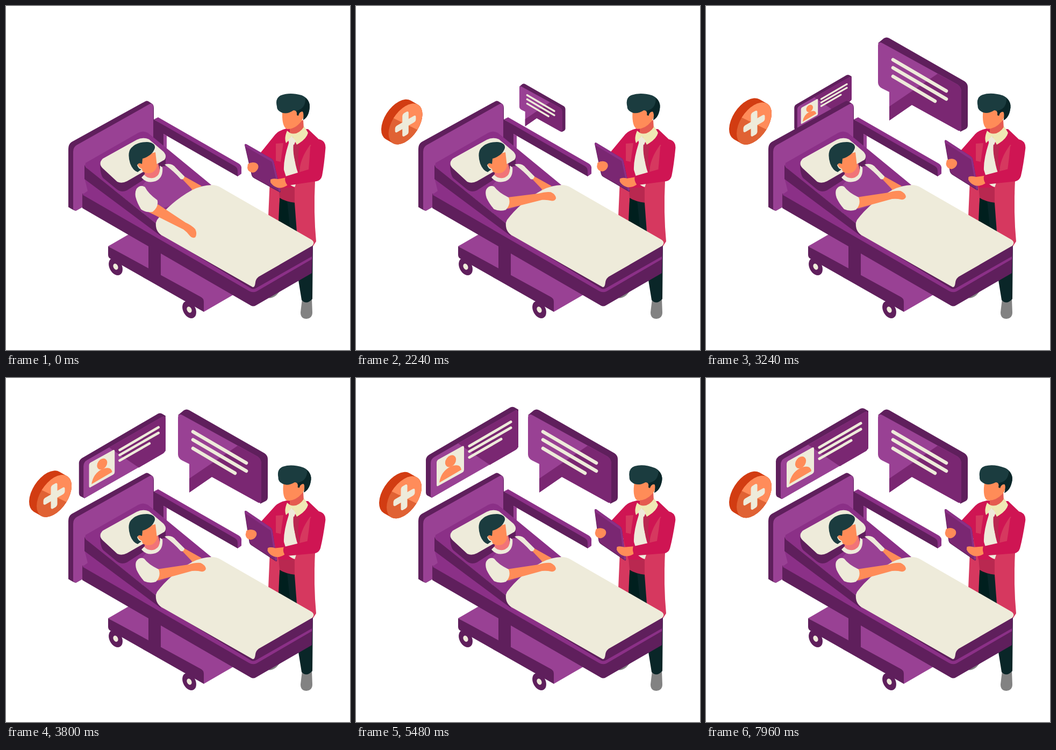
These frames come from a looping animation (640 px wide and 640 px high, 8 s). An HTML page:

```html
<!DOCTYPE html>
<html lang="en">
<head>
<meta charset="utf-8">
<title>Hospital visit</title>
<style>
html, body { margin: 0; width: 100%; height: 100%; overflow: hidden; background: #fff; }
svg { display: block; width: 100vw; height: 100vh; }
.dark { fill: #5f1f5c; } .mid { fill: #8b3087; } .light { fill: #994194; } .shade { fill: #7a2772; }
.cream { fill: #eeebda; } .skin { fill: #ff8c58; } .hair { fill: #1b3c3f; } .night { fill: #0a2628; }
.red { fill: #cf1553; } .coat { fill: #d6385f; } .wine { fill: #b92850; } .grey { fill: #828282; }
.rules { fill: none; stroke: #eeebda; stroke-linecap: round; }
</style>
</head>
<body>
<svg viewBox="0 0 640 640">
  <g id="badge">
    <g transform="translate(89.5 217.5) matrix(1 -.577 0 1.06 0 0)">
      <path d="M0 0L-14 -15.2" stroke="#d23c12" stroke-width="65" stroke-linecap="round"/>
      <circle r="32.5" fill="#e06234"/>
      <path d="M-23 -23A32.5 32.5 0 0 1 23 23Z" fill="#ff8c5a"/>
      <rect class="cream" x="-20" y="-6" width="40" height="12" rx="4"/>
      <rect class="cream" x="-6" y="-21" width="12" height="42" rx="4"/>
    </g>
  </g>

  <g id="bubble">
    <path class="dark" d="M320 69L331 60Q336 57 341 60L481 140Q487 144 487 151V222Q487 227 483 229L473 234 460 170Z"/>
    <path class="light" d="M320 74Q320 65 328 69L468 146Q475 151 475 160V226Q475 235 468 231L383 184 341 213V160L327 153Q320 149 320 142Z"/>
    <path class="shade" d="M431 126L468 146Q475 151 475 160V226Q475 235 468 231L383 184 341 213V187Z"/>
    <path class="rules" stroke-width="6.5" d="M348 100L447 158M348 115L447 173M348 131L426 177"/>
  </g>

  <g id="card">
    <path class="dark" d="M130 152Q130 146 136 142L287 54Q291 52 295 54L302 58V128L141 222 133 218Q130 216 130 212Z"/>
    <path class="light" d="M139 158Q139 150 146 146L294 61Q302 57 302 65V123Q302 130 297 133L141 222 139 219Z"/>
    <path class="shade" d="M190 121L294 61Q302 57 302 65V123Q302 130 297 133L249 161Z"/>
    <path class="cream" d="M150 157Q150 153 153 151L198 126Q201 125 201 128V170Q201 173 198 175L153 200Q150 202 150 198Z"/>
    <path class="skin" d="M155 194Q158 173 176 164Q194 157 196 170Z"/>
    <ellipse class="skin" cx="176" cy="154" rx="9" ry="12" transform="rotate(36 176 154)"/>
    <path class="rules" stroke-width="5" d="M211 126L288 81M211 136L288 92M211 147L270 113"/>
  </g>

  <g id="doctor">
    <path class="grey" d="M483 541Q492 547 503 538L513 527 495 530ZM551 545L548 570Q548 582 559 582Q570 581 570 570L569 545Z"/>
    <path class="night" d="M509 355H570L571 440 570 545Q559 557 550 547L544 510 506 400Z"/>
    <path d="M509 355L523 362 528 410 506 402Z" fill="#001f1e"/>
    <path class="coat" d="M492 300L488 391 507 402 509 357 515 300Z"/>
    <path class="wine" d="M503 290H548V340L538 366Q520 364 509 357Z"/>
    <g id="farArm">
      <path class="red" d="M522 228Q508 231 501 239L472 275 492 300 520 272Z"/>
    </g>
    <path class="red" d="M522 228Q508 232 502 250L495 290 507 338H548L580 300 583 249 562 229Z"/>
    <path class="coat" d="M502 256L516 255 511 290 502 288Z"/>
    <path class="cream" d="M527 252Q516 285 517 305L525 330Q537 340 547 338L550 325Q535 300 535 255Z"/>
    <path class="coat" d="M566 258Q546 285 546 310L537 338V366L541 420 571 447 577 438Q572 385 575 325L590 270Z"/>
    <path class="red" d="M541 257L561 235 580 247 558 258Q545 275 546 306Q535 286 541 257Z"/>
    <path class="wine" d="M541 257L535 255Q532 282 545 306L547 303Q540 285 547 259Z"/>
    <path d="M528 222L553 212 554 228Q545 243 528 236Z" fill="#e55b50"/>
    <path d="M523 232Q517 246 521 255L533 243 541 258Q559 248 562 236L555 224Q543 242 528 236Z" fill="#f0e9b4"/>
    <path class="cream" d="M532 242L539 251 536 258 527 257 525 249Z"/>
    <g id="head">
      <path class="skin" d="M514 190V207Q515 226 523 229Q538 229 549 215Q556 206 554 196L540 185Z"/>
      <path class="hair" d="M504 187Q500 171 512 166Q528 160 550 166Q565 172 565 188Q564 206 553 212Q555 197 551 196Q545 197 544 204L541 203Q542 194 535 194Q520 204 509 196Q504 193 504 187Z"/>
      <path class="night" d="M557 171Q566 178 565 188Q563 206 553 212Q555 197 551 196Q545 197 544 204L541 203Q542 198 540 195Q558 191 557 171Z"/>
    </g>
    <g id="tablet">
      <path class="dark" d="M444 259Q444 256 447 257L494 284Q497 286 498 289L511 344Q511 348 508 346L461 320Q458 318 457 315Z"/>
      <path class="shade" d="M447 258L493 285Q495 286 496 289L509 345 461 319 458 315 445 261Z"/>
      <path class="mid" d="M444 259Q444 256 447 257L494 284Q497 286 498 289L511 344 508 346 495 290 446 262Z"/>
      <path class="skin" d="M450 294Q457 289 465 292Q471 295 469 302Q466 309 459 310Q450 309 449 301Z"/>
      <path class="skin" d="M492 323Q496 320 506 322L522 319 524 333Q515 340 505 338Q496 335 492 328Z"/>
    </g>
    <g id="nearArm">
      <path class="red" d="M566 262Q573 248 583 248Q595 251 594.5 264Q592 295 588 316Q586 324 578 326L524 334Q517 325 520 317L563 304Q565 282 566 262Z"/>
    </g>
  </g>

  <g id="bed">
    <path class="light" d="M190 447L228 425 240 420 425 530V536L368 569 360 545Z"/>
    <path class="dark" d="M190 447L362 541Q368 544 368 550V569L194 470Q190 468 190 463ZM265 428L288 440V501L265 488Z"/>
    <g id="wheel">
      <ellipse class="dark" rx="11.5" ry="17" transform="translate(204 485) rotate(-28)"/>
      <ellipse class="cream" rx="4.2" ry="6" transform="translate(204 485) rotate(-28)"/>
    </g>
    <use href="#wheel" x="137" y="80"/>

    <path class="mid" d="M275 211L283 207 433 293Q439 297 438 303V312L431 317 420 300Z"/>
    <path class="dark" d="M275 211L426 298Q431 301 431 307V317L293 238V268L275 255Z"/>
    <path class="light" d="M293 238L299 241V272L293 268Z"/>

    <path class="dark" d="M116 266Q116 257 122 253L258 178Q262 175 266 178L272 182Q275 184 275 190V300L130 381Q127 381 116 374Z"/>
    <path class="light" d="M125 271Q125 263 131 259L266 183Q274 179 274 188V300L130 381 125 378Z"/>

    <path class="dark" d="M142 349V376L455 557Q460 560 465 557L569 497 571 444 460 490 280 410Z"/>
    <path class="mid" d="M142 351L152 344 146 320 290 425 455 525Q460 528 465 525L569 466V471L466 531Q459 534 452 530Z"/>
    <path class="mid" d="M148 292L246 236Q255 231 264 236L382 333 288 412 147 300Z"/>
    <path class="dark" d="M146 295Q147 300 152 303L282 407 288 428 146 322Z"/>
    <path class="dark" d="M175 297Q176 318 183 322L206 341Q215 348 225 343L297 297 297 280Z"/>
    <path class="cream" d="M180 284L243 249Q255 243 266 248L293 271Q300 279 295 286L225 326Q215 331 207 327L180 302Q171 293 180 284Z"/>

    <path class="skin" d="M330 316L364 335 348 344Q335 335 326 322Z"/>
    <path class="light" d="M252 336L262 324Q285 330 291 298L304 299 328 322 346 341 310 370 286 378 270 376Z"/>
    <path d="M260 305L283 293Q289 312 283 318Q272 325 257 315Z" fill="#f17478"/>
    <path class="cream" d="M252 319Q262 331 278 326Q293 320 291 300L286 297Q288 314 277 319Q266 323 257 314Z"/>
    <path class="cream" d="M295 295Q308 291 316 301L332 317Q331 324 325 322Q313 308 295 295Z"/>
    <path class="skin" d="M244 291Q245 300 253 303Q253 311 265 311Q277 311 281 298L278 272Q258 276 250 288Z"/>
    <path class="hair" d="M231 293Q225 273 233 264Q243 253 262 253Q278 254 277 264Q273 278 254 284L253 294Q247 290 244 296Q246 303 252 304L245 309Q236 306 231 293Z"/>
    <path class="cream" d="M281 398Q305 366 345 343Q365 333 383 333Q392 333 400 338L567 434Q576 439 570 446L473 502Q465 506 464 514Q463 524 459 523L294 429Q277 421 279 403Z"/>

    <g id="upperArm">
      <path id="forearm" class="skin" d="M280 356L340 347Q352 343 362 344Q371 348 372 355Q370 361 363 360Q355 358 346 359L277 378 265 378Z"/>
      <path class="cream" d="M242 342Q248 332 257 336Q265 347 284 356Q289 368 279 379Q268 383 257 378Q248 368 243 357Q240 349 242 342Z"/>
    </g>
  </g>
</svg>
<script>
const LOOP = 8000;
const byId = id => document.getElementById(id);
const move = (id, transform) => byId(id).setAttribute("transform", transform);
const progress = (t, start, length) => Math.min(1, Math.max(0, (t - start) / length));
const wave = x => (1 - Math.cos(Math.PI * x)) / 2;
const cubic = x => x < .5 ? 4 * x ** 3 : 1 - 4 * (1 - x) ** 3;

// The picture advances in steps of 112 ms rounded to a 40 ms grid.
function stepTime(t) {
  const start = n => Math.round(n * 2.8) * 40;
  let n = Math.floor(t / 112) + 1;
  while (start(n) > t) n--;
  return start(n);
}

function grow(id, scale, x, y, drift) {
  byId(id).style.display = scale > .01 ? "" : "none";
  move(id, `translate(${x} ${y + drift}) scale(${scale}) translate(${-x} ${-y})`);
}

function render(t) {
  const badge = wave(progress(t, 50, 2470));
  grow("badge", badge, 170, 279, 5 * wave(Math.max(0, t - 1800) / 4500));
  grow("bubble", wave(progress(t, 1300, 1850)), 287, 235, 0);
  grow("card", wave(progress(t, 2000, 2150)), 220, 250, 3.4 * wave(Math.max(0, t - 4150) / 4500));

  move("upperArm", `rotate(${10 * (1 - badge)} 253 345)`);
  move("forearm", `rotate(${32 * (1 - badge)} 270 372)`);

  const lift = cubic(progress(t, 0, 6200));
  move("tablet", `translate(0 ${-13 * lift}) rotate(${5.6 * lift} 444 257)`);
  move("nearArm", `rotate(${4 * lift} 572 260)`);
  move("farArm", `rotate(${4 * lift} 520 235)`);
  move("head", `rotate(${5.8 * cubic(progress(t, 0, 7500))} 538 235)`);
}

const began = performance.now();
function tick() {
  render(stepTime((performance.now() - began) % LOOP));
  requestAnimationFrame(tick);
}
render(0);
tick();
</script>
</body>
</html>
```
